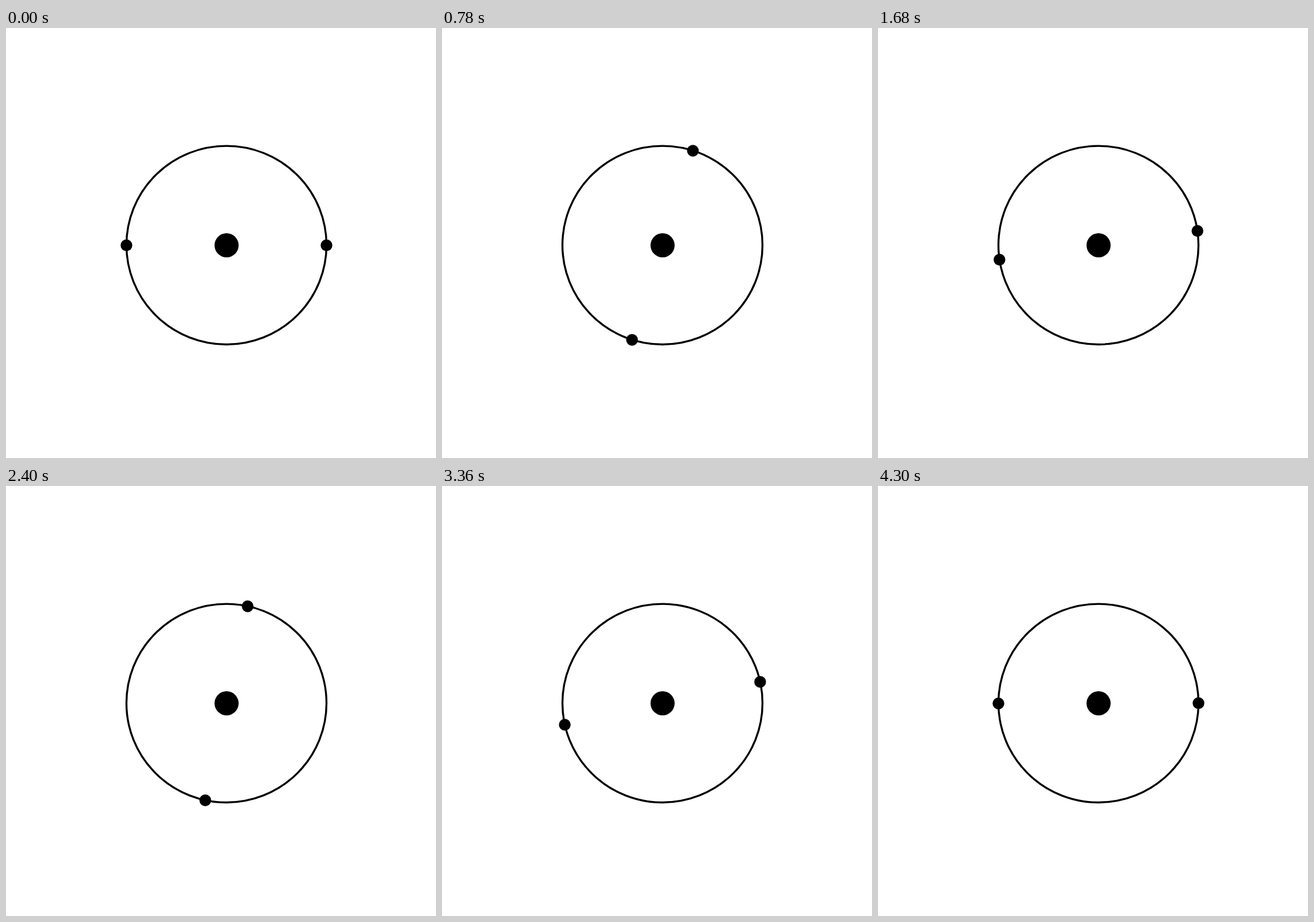
An HTML page that plays this animation: 748x748 px, repeating every 4.53 s.

```html
<!DOCTYPE html>
<html lang="en">
<head>
<meta charset="utf-8">
<title>Orbit</title>
<style>
  html, body { margin: 0; width: 100%; height: 100%; overflow: hidden; background: #fff; }
  svg { display: block; width: 100vw; height: 100vh; }
</style>
</head>
<body>
<svg viewBox="0 0 748 748">
  <ellipse cx="383.5" cy="377.8" rx="174" ry="172.7" fill="none" stroke="#000" stroke-width="3.4"/>
  <circle cx="383.7" cy="378" r="21"/>
  <circle class="dot" r="10.2"/>
  <circle class="dot" r="10.2"/>
</svg>
<script>
  const LOOP = 4530, STEP = 30, SPIN = 4500;
  const TURN = 4 * Math.PI;
  const RAMP = 0.03; // share of the spin spent speeding up
  const dots = document.querySelectorAll('.dot');

  // Short cubic ease-in joined to a long cubic ease-out.
  function ease(x) {
    return x < RAMP
      ? x ** 3 / RAMP ** 2
      : 1 - (1 - x) ** 3 / (1 - RAMP) ** 2;
  }

  function draw(ms) {
    const time = Math.floor((ms % LOOP) / STEP) * STEP;
    const angle = TURN * ease(Math.min(time / SPIN, 1));
    dots.forEach((dot, i) => {
      const a = angle + i * Math.PI;
      dot.setAttribute('cx', 383.5 + 174 * Math.cos(a));
      dot.setAttribute('cy', 378 + 172.7 * Math.sin(a));
    });
  }

  const start = performance.now();
  function tick() {
    draw(performance.now() - start);
    requestAnimationFrame(tick);
  }
  tick();
</script>
</body>
</html>
```
